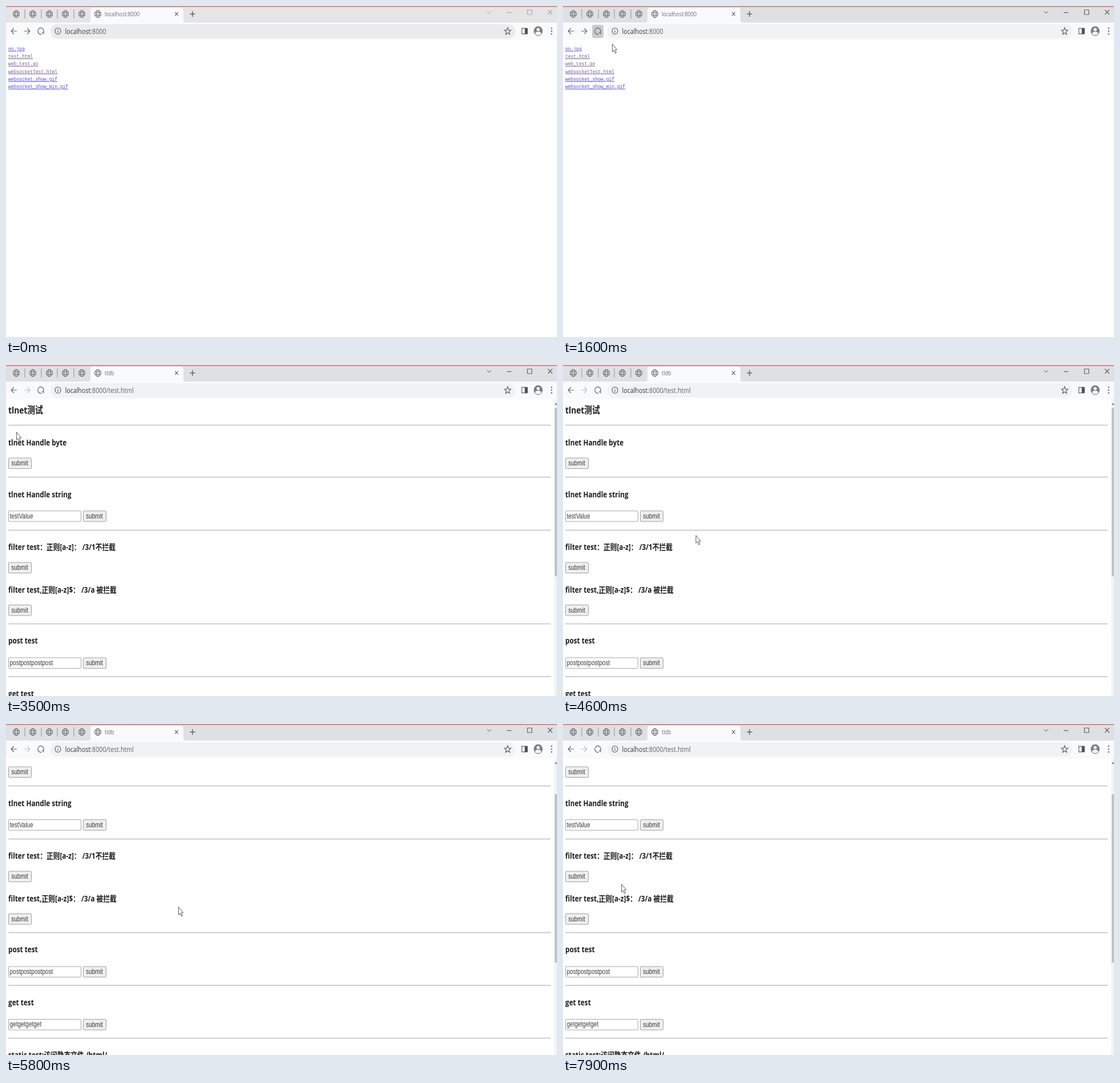
Animation, 966 px wide and 580 px high, one loop 8000 ms. Source, as an HTML page:

```html
<!DOCTYPE html>
<html lang="zh">
<head>
<meta charset="utf-8">
<title>tldb</title>
<style>
html, body { margin: 0; width: 100%; height: 100%; overflow: hidden; background: #fff; }
svg { display: block; width: 966px; height: 580px; }
text { white-space: pre; }
.ui { font-family: "Open Sans", "Noto Sans", sans-serif; }
.head { font-family: "Open Sans", "Noto Sans CJK SC", sans-serif; font-weight: 700; fill: #1c1c1c; }
.form { font-family: "Liberation Sans", sans-serif; font-size: 12px; fill: #3a3a3a; }
.link { font-family: "Liberation Mono", monospace; font-size: 9.55px; text-decoration: underline; fill: #4a4ae4; }
.seen { fill: #75608f; }
.icon { fill: none; stroke: #5f6266; stroke-width: 1.2; }
</style>
</head>
<body>
<svg id="stage" viewBox="0 0 966 580" xmlns="http://www.w3.org/2000/svg"></svg>
<script>
const LOOP = 8000, STEP = 100;
const SQUEEZE = 0.835;

const rect = (x, y, w, h, fill, more = '') =>
  `<rect x="${x}" y="${y}" width="${w}" height="${h}" fill="${fill}" ${more}/>`;
const icon = (x, y, d, more = '') =>
  `<path class="icon" transform="translate(${x} ${y})" d="${d}" ${more}/>`;
const label = (x, y, str, cls, more = '') =>
  `<text class="${cls}" transform="translate(${x} ${y}) scale(${SQUEEZE} 1)" ${more}>${str}</text>`;

// browser frame
const globe = x => icon(x, 14,
  'M-5.5 0a5.5 6 0 1 0 11 0a5.5 6 0 1 0-11 0M-2.4 0a2.4 6 0 1 0 4.8 0a2.4 6 0 1 0-4.8 0M-5-2.2H5M-5 2.2H5',
  'style="stroke-width:1"');
const tabs = [18, 47, 76, 104, 133, 161].map(globe).join('') +
  [33, 62, 90, 119].map(x => rect(x - 0.5, 6, 1, 16, '#909296')).join('');

const frame = `
  <rect id="strip" width="966" height="32"/>
  ${rect(0, 29, 966, 31, '#f9fafc')}
  <path d="M143 30q5 0 5-5V8q0-5 5-5H306q5 0 5 5V25q0 5 5 5z" fill="#f9fafc"/>
  ${rect(0, 0, 966, 1.6, '#dc7672')}
  ${tabs}
  ${label(173, 18, '', 'ui', 'id="title" font-size="10.9" fill="#6c6f73"')}
  ${icon(299, 14, 'M-2.8-3.2L2.8 3.2M2.8-3.2L-2.8 3.2')}
  ${icon(327, 14, 'M-4.5 0H4.5M0-5V5', 'style="stroke-width:1.4"')}
  <g id="buttons">
    ${icon(847, 11, 'M-3.5-2L0 2L3.5-2', 'style="stroke-width:1"')}
    ${icon(882, 11.5, 'M-4 0H4')}
    ${icon(918, 11, 'M-3.8-4H3.8V4H-3.8z')}
    ${icon(954, 11, 'M-3.8-4L3.8 4M3.8-4L-3.8 4')}
  </g>
  ${icon(14, 44, 'M5 0H-4.5M-.3-5L-4.8 0L-.3 5')}
  <g id="forward">${icon(37, 44, 'M-5 0H4.5M.3-5L4.8 0L.3 5')}</g>
  ${rect(51, 33, 20, 23, '#c9cbce', 'id="hover" rx="3"')}
  ${icon(61, 44, 'M1.4 5.4A5.2 5.6 0 1 1 4.5 2.8M5.3 5.4L4.5 2.5L1.8 3.4')}
  <rect id="pill" x="78" y="32" width="815" height="25" rx="12"/>
  ${icon(91, 44, 'M-5 0a5 5.5 0 1 0 10 0a5 5.5 0 1 0-10 0M0-.8V3M0-3.2V-2')}
  <text class="ui" transform="translate(103.5 48.7) scale(${SQUEEZE} 1)" font-size="12.8" fill="#35383b">localhost<tspan id="path" fill="#606367"></tspan></text>
  ${icon(879.5, 44, 'M0-6L1.6-1.9L5.6-1.7L2.5 1.2L3.5 5.6L0 3.2L-3.5 5.6L-2.5 1.2L-5.6-1.7L-1.6-1.9z')}
  ${icon(909, 44, 'M-4.7-4.8H4.7V4.8H-4.7z')}
  ${rect(909.5, 39, 5, 10, '#4a4d51')}
  <ellipse cx="933" cy="44" rx="7.8" ry="8.5" fill="#7b7e82"/>
  <circle cx="933" cy="41.2" r="2.8" fill="#f4f5f6"/>
  <path d="M927.6 49q0-4 5.4-4t5.4 4q-2.2 2.3-5.4 2.3t-5.4-2.3z" fill="#f4f5f6"/>
  ${[39, 44, 49].map(y => `<circle cx="956.5" cy="${y}" r="1.2" fill="#5f6266"/>`).join('')}`;

// directory listing
const files = ['nn.jpg', 'test.html', 'web_test.go', 'websocketTest.html',
  'websocket_show.gif', 'websocket_show_min.gif'];
const listing = files.map((name, i) =>
  label(4, 77.6 + i * 13.3, name, i > 0 && i < 4 ? 'link seen' : 'link')).join('');

// test page
const head = (y, str, size = 14.1) => label(4, y, str, 'head', `font-size="${size}"`);
const rule = y => rect(4, y - 1, 951, 2, '#cdcdcd');
const button = (x, y, id = '') =>
  rect(x + 0.5, y - 9, 40, 18.5, '#efefef', `stroke="#a0a0a0" rx="1.5" ${id && `id="${id}"`}`) +
  label(x + 5.2, y + 4, 'submit', 'form');
const field = (y, str) =>
  rect(4.5, y - 9, 127, 18.5, '#fff', 'stroke="#a6a6a6" rx="1"') +
  label(6.5, y + 3.8, str, 'form') + button(135, y);

const form = [
  head(85, 'tlnet测试', 16.5), rule(105.5),
  head(140.6, 'tlnet Handle byte'), button(4, 172), rule(196.5),
  head(231.6, 'tlnet Handle string'), field(264.7, 'testValue'), rule(289.5),
  head(324.2, 'filter test：正则[a-z]： /3/1不拦截'), button(4, 355, 'first'),
  head(398.6, 'filter test,正则[a-z]$： /3/a 被拦截'), button(4, 429.5), rule(453.5),
  head(488.4, 'post test'), field(522, 'postpostpostpost'), rule(546),
  head(580.8, 'get test'), field(614.5, 'getgetgetget'), rule(638.5),
  head(673.2, 'static test:访问静态文件 /html/')
].join('');

const stage = document.getElementById('stage');
stage.innerHTML = `
  <clipPath id="view"><rect y="58" width="966" height="522"/></clipPath>
  ${rect(0, 0, 966, 580, '#fff')}
  ${frame}
  <g id="listing">${listing}</g>
  <g id="test" clip-path="url(#view)">
    <g id="form">${form}</g>
    ${rect(961, 60, 5, 520, '#f3f3f3')}
    <path d="M962.4 70l2-3.5 1.6 3z" fill="#555"/>
    ${rect(962, 75, 4, 295, '#c1c1c1', 'id="thumb"')}
  </g>
  <g id="cursor" stroke="#5a5a5a" fill="#fff" stroke-linejoin="round">
    <path id="arrow" d="M.5.5V14.2L3.2 11.6L5.4 17L7.5 16L5.3 10.8H8.8z"/>
    <path id="hand" d="M3 10V1.5Q3 .3 4.2.3T5.4 1.5V7Q7.6 5.8 8 7.5Q10 6.6 10.3 8.2Q12.4 7.6 12.4 9.6V13Q12.4 16 10.8 18.6H4.8Q3.4 15.6.6 12.2Q-.3 10.4 1.2 10.1Q2 10 3 11.5z"/>
  </g>`;

const el = {};
stage.querySelectorAll('[id]').forEach(n => el[n.id] = n);

// rows of time and values
const pointer = [
  [300, 122, 106], [600, 100, 84], [900, 62, 45], [1300, 62, 45], [1600, 86, 66],
  [1800, 78, 88], [2200, 41, 139], [2800, 41, 139], [3200, 22, 87], [3400, 20, 98],
  [3600, 16, 136], [4000, 80, 205], [4500, 221, 295], [4600, 232.5, 298], [5300, 233.5, 298],
  [5400, 268, 310], [5500, 301, 319], [5700, 301, 319], [5800, 302, 320], [5900, 302, 320],
  [6400, 24, 266], [7500, 22, 268], [7900, 102, 280]
];
const scroll = [[4600, 0], [4700, 40], [4800, 79], [4900, 88]];

function at(rows, t) {
  if (t <= rows[0][0]) return rows[0].slice(1);
  const i = rows.findIndex(r => r[0] >= t);
  if (i < 0) return rows[rows.length - 1].slice(1);
  const a = rows[i - 1], b = rows[i], k = (t - a[0]) / (b[0] - a[0]);
  return a.slice(1).map((v, j) => v + (b[j + 1] - v) * k);
}
const show = (node, on) => node.setAttribute('display', on ? 'inline' : 'none');
const within = (t, a, b) => t >= a && t < b;

function draw(time) {
  const t = Math.floor((time % LOOP) / STEP) * STEP;
  const focused = t >= 1400, loaded = t >= 3400;
  el.strip.setAttribute('fill', focused ? '#dee0e4' : '#e5e5e6');
  el.pill.setAttribute('fill', focused ? '#f0f2f4' : '#e9ebee');
  el.buttons.setAttribute('opacity', focused ? 1 : 0.45);
  el.forward.setAttribute('opacity', loaded ? 0.4 : 1);
  el.title.textContent = loaded ? 'tldb' : 'localhost:8000';
  el.path.textContent = loaded ? ':8000/test.html' : ':8000';
  show(el.hover, within(t, 1000, 2300));
  show(el.listing, !loaded);
  show(el.test, loaded);

  const [top] = at(scroll, t);
  el.form.setAttribute('transform', `translate(0 ${-top})`);
  el.thumb.setAttribute('y', 75 + top * 0.545);
  el.first.setAttribute('fill', within(t, 6400, 7600) ? '#e5e5e5' : '#efefef');

  const [x, y] = at(pointer, t), onLink = within(t, 2200, 3400);
  show(el.cursor, t >= 300);
  el.cursor.setAttribute('transform', `translate(${x} ${y})`);
  show(el.arrow, !onLink);
  show(el.hand, onLink);
}

const start = performance.now();
function tick() {
  draw(performance.now() - start);
  requestAnimationFrame(tick);
}
tick();
</script>
</body>
</html>
```
